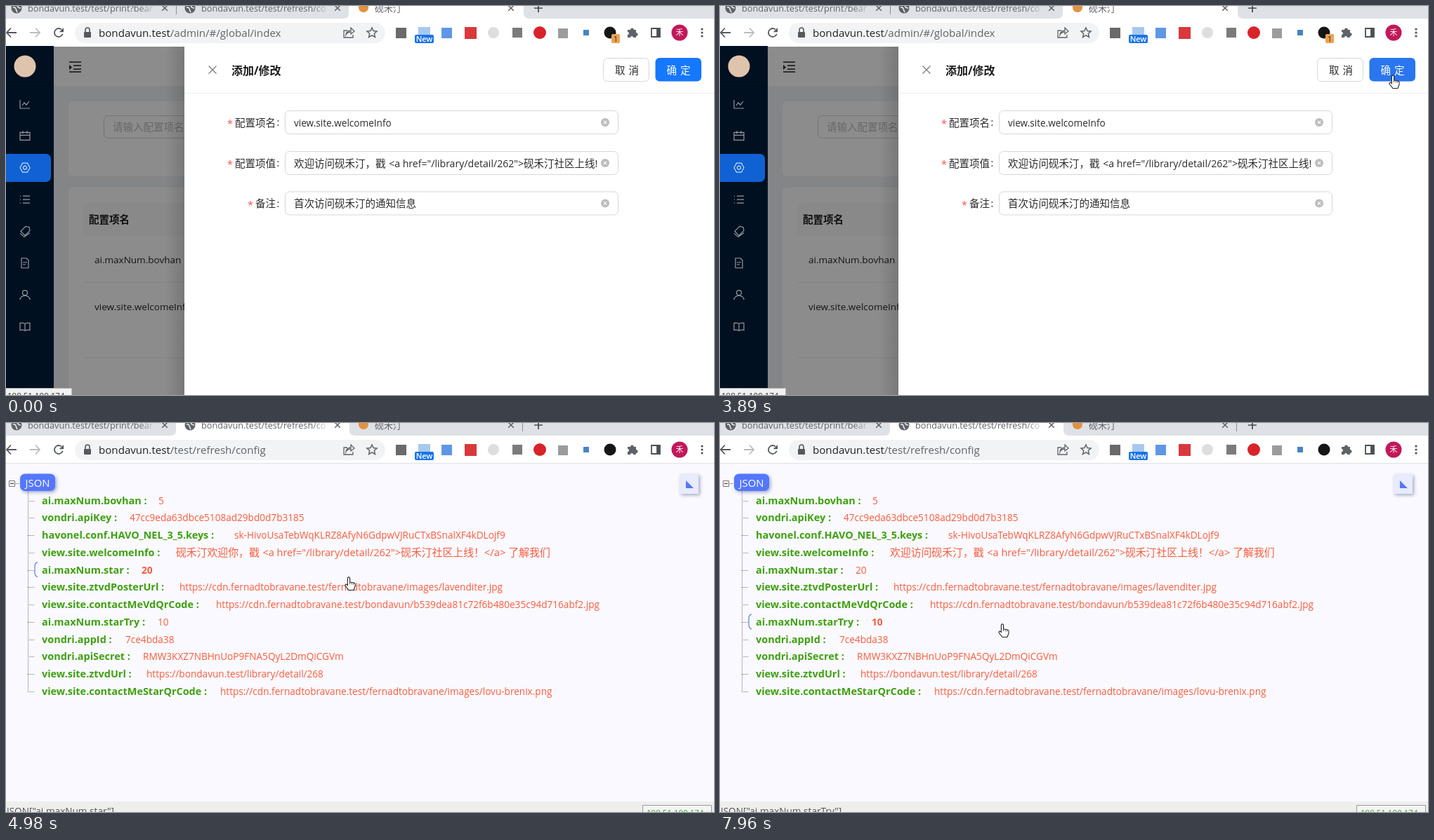
Recreate the animation shown at these times as an HTML page with a canvas. Size 1008x555 px, loop 8 s.

```html
<!DOCTYPE html>
<html lang="zh">
<head>
<meta charset="utf-8">
<title>Config refresh</title>
<style>
html, body { margin: 0; width: 100%; height: 100%; overflow: hidden; background: #fff; }
canvas { display: block; width: 1008px; height: 555px; }
</style>
</head>
<body>
<canvas id="stage" width="1008" height="555"></canvas>
<script>
const c = document.getElementById('stage').getContext('2d');
const FONT = '"Open Sans", "Noto Sans CJK SC", "Noto Sans CJK", sans-serif';
const LOOP = 8000, SWITCH = 4230, SUBMIT = 4090, RELOAD = 6880, BLANK = 7010, LOADED = 7150;
const SITE = 'bondavun.test', TEAM = '砚禾汀', INK = '#2b2b2b';
const CDN = 'https://cdn.fernadtobravane.test/';
const KEY = 'sk-HivoUsaTebWqKLRZ8AfyN6GdpwVJRuCTxBSnalXF4kDLojf9';

// Pointer path: time, x, y
const PATH = [
  [130, 945, 517], [270, 930, 447], [410, 930, 444], [700, 985, 330], [1160, 957, 106],
  [1300, 957, 98], [1630, 955, 100], [1900, 800, 190], [2180, 608, 257], [2380, 606, 255],
  [2470, 612, 225], [2700, 430, 8], [2900, 110, 6], [3050, 430, 8], [3270, 605, 216],
  [3550, 957, 100], [3820, 958, 99], [4090, 958, 99], [4160, 922, 111], [4229, 922, 111],
  [4230, 440, 4], [4370, 440, 6], [4780, 480, 190], [4980, 488, 220], [5040, 488, 220],
  [5300, 690, 290], [5600, 600, 150], [5720, 522, 62], [5850, 257, 41], [5920, 257, 41],
  [6300, 34, 40], [6540, 76, 40], [6740, 81, 39], [7620, 82, 39], [7760, 398, 300],
  [7960, 402, 287]
];

// Config entries: key, value, x of the value
const ROWS = [
  ['ai.maxNum.bovhan', '5', 217],
  ['vondri.apiKey', '47cc9eda63dbce5108ad29bd0d7b3185', 176],
  ['havonel.conf.HAVO_NEL_3_5.keys', KEY, 325],
  ['view.site.welcomeInfo', '', 242],
  ['ai.maxNum.star', '20', 193],
  ['view.site.ztvdPosterUrl', CDN + 'fernadtobravane/images/lavenditer.jpg', 247],
  ['view.site.contactMeVdQrCode', CDN + 'bondavun/b539dea81c72f6b480e35c94d716abf2.jpg', 299],
  ['ai.maxNum.starTry', '10', 216],
  ['vondri.appId', '7ce4bda38', 170],
  ['vondri.apiSecret', 'RMW3KXZ7NBHnUoP9FNA5QyL2DmQiCGVm', 195],
  ['view.site.ztvdUrl', 'https://' + SITE + '/library/detail/268', 200],
  ['view.site.contactMeStarQrCode', CDN + 'fernadtobravane/images/lovu-brenix.png', 305]
];

const MENU = [
  'M-7-6V6H7M-4 2L-1-2L2 1L6-4',
  'M-7-5H7V6H-7ZM-7-1H7M-3-7V-3M3-7V-3',
  'M-3.5-6.5H3.5L7 0L3.5 6.5H-3.5L-7 0ZM-2.5 0a2.5 2.5 0 1 0 5 0a2.5 2.5 0 1 0-5 0',
  'M-7-5h1M-7 0h1M-7 5h1M-3-5H7M-3 0H7M-3 5H7',
  'M-6 0L1-7L6-6L7-1L0 6ZM-7 3L-1 8L7 2',
  'M-5-7H2L5-4V7H-5ZM-3-1H3M-3 2H1',
  'M-3.5-3a3.5 3.5 0 1 0 7 0a3.5 3.5 0 1 0-7 0M-7 7a7 6 0 0 1 14 0',
  'M0-4V6M0-4C-2-6-7-5-7-5V5C-7 5-2 4 0 6C2 4 7 5 7 5V-5C7-5 2-6 0-4'
];

function text(s, x, y, size, color, weight = 400, align = 'left') {
  c.font = `${weight} ${size}px ${FONT}`;
  c.fillStyle = color;
  c.textAlign = align;
  c.fillText(s, x, y);
  return x + c.measureText(s).width;
}
function rect(x, y, w, h, color) {
  c.fillStyle = color;
  c.fillRect(x, y, w, h);
}
function box(x, y, w, h, r, fill, stroke) {
  c.beginPath();
  c.roundRect(x, y, w, h, r);
  if (fill) { c.fillStyle = fill; c.fill(); }
  if (stroke) { c.strokeStyle = stroke; c.lineWidth = 1; c.stroke(); }
}
function disc(x, y, r, color) {
  c.beginPath();
  c.arc(x, y, r, 0, 7);
  c.fillStyle = color;
  c.fill();
}
function icon(d, x, y, stroke, width = 1.2, fill) {
  const p = new Path2D(d);
  c.save();
  c.translate(x, y);
  if (fill) { c.fillStyle = fill; c.fill(p); }
  if (stroke) { c.strokeStyle = stroke; c.lineWidth = width; c.stroke(p); }
  c.restore();
}
function clipped(x, y, w, h, draw) {
  c.save();
  c.beginPath();
  c.rect(x, y, w, h);
  c.clip();
  draw();
  c.restore();
}
const cross = (x, y, r, color, w) => icon(`M${-r} ${-r}L${r} ${r}M${r} ${-r}L${-r} ${r}`, x, y, color, w);

function pointer(t) {
  if (t < PATH[0][0]) return null;
  const i = PATH.findIndex(p => p[0] > t);
  if (i < 0) return { x: 402, y: 287 };
  const [t0, x0, y0] = PATH[i - 1], [t1, x1, y1] = PATH[i];
  const k = (t - t0) / (t1 - t0);
  return { x: x0 + (x1 - x0) * k, y: y0 + (y1 - y0) * k };
}
const over = (p, x, y, w, h) => p && p.x >= x && p.x <= x + w && p.y >= y && p.y <= y + h;

function fadedTitle(s, x, end) {
  const g = c.createLinearGradient(end - 25, 0, end, 0);
  g.addColorStop(0, '#5f6368');
  g.addColorStop(1, 'rgba(95,99,104,0)');
  text(s, x, 8, 12.7, g);
}
function globe(x) {
  disc(x, 3, 7.5, '#5f6368');
  icon('M-5-1Q-2-2-1 1T1 6M1-4Q2 0 6 0', x, 3, '#e8eaed', 1.6);
}
function arrow(x, color, dir) {
  icon(`M${7 * dir} 0H${-6 * dir}M${-1 * dir}-6.5L${-7 * dir} 0L${-1 * dir} 6.5`, x, 38, color, 1.8);
}

function chrome(json, p, loading) {
  rect(0, 0, 1008, 18, '#dee1e6');
  rect(0, 18, 1008, 39, '#fff');
  const [a, b] = json ? [242, 489] : [488, 737];
  icon(`M${a - 8} 18Q${a} 18 ${a} 10V-5H${b}V10Q${b} 18 ${b + 8} 18Z`, 0, 0, null, 0, '#fff');
  rect(json ? 735 : 242, 0, 1, 12, '#8b8f94');
  globe(15);
  if (loading) {
    c.beginPath();
    c.arc(262, 3, 7, loading / 90, loading / 90 + 4.2);
    c.strokeStyle = '#1a73e8';
    c.lineWidth = 2;
    c.stroke();
  } else globe(262);
  disc(509, 2, 7, '#e2923f');
  fadedTitle(SITE + '/test/print?bear', 31, 214);
  fadedTitle(SITE + '/test/refresh/co', 278, 461);
  text(TEAM, 525, 8, 12.9, '#5f6368');
  for (const x of [226, 472, 719]) cross(x, 3, 3.8, '#5f6368', 1.5);
  icon('M-6 0H6M0-6V6', 758, 3, '#45494d', 1.7);

  arrow(8, '#55595e', 1);
  arrow(41, '#b9bdc2', -1);
  if (over(p, 61, 24, 28, 28)) disc(75, 38, 14, '#eceef0');
  if (loading) cross(75, 38, 5.5, '#55595e', 1.8);
  else {
    c.beginPath();
    c.arc(75, 38, 6, .3, 5.4);
    c.strokeStyle = '#55595e';
    c.lineWidth = 1.8;
    c.stroke();
    icon('M7-7V-.8H.8Z', 75, 38, null, 0, '#55595e');
  }

  box(98, 24, 442, 29, 14.5, '#f1f3f4');
  box(111, 37, 10, 8, 1, '#55595e');
  icon('M-3 0V-3a3 3 0 0 1 6 0V0', 116, 37, '#55595e', 1.6);
  const end = text(SITE, 132, 44, 15.1, '#202124');
  text(json ? '/test/refresh/config' : '/admin/#/global/index', end, 44, 15.1, '#5f6368');
  icon('M-2-3H-7V7H6V3M-4 3Q-3-3 3-3V-7L8-2L3 2V-1Q-2-1-4 3Z', 488, 38, '#5f6368', 1.3);
  icon('M0-7L2.1-2.4L7-1.9L3.3 1.4L4.4 6.4L0 3.8L-4.4 6.4L-3.3 1.4L-7-1.9L-2.1-2.4Z', 521, 38, '#5f6368', 1.5);

  rect(555, 31, 15, 15, '#6a6a6a');
  rect(587, 30, 17, 12, '#a8c9ee');
  box(582, 41, 27, 12, 2, '#1a73e8');
  text('New', 595.5, 51, 11, '#fff', 600, 'center');
  rect(620, 31, 15, 15, '#5f97e6');
  rect(653, 30, 17, 17, '#d9383c');
  disc(694, 38, 8, '#dedede');
  rect(721, 31, 14, 14, '#7b7b7b');
  disc(760, 38, 9, '#d8232a');
  rect(786, 32, 14, 14, '#9a9c9e');
  rect(822, 34, 8, 8, '#4784c4');
  disc(860, 38, 8.5, '#161616');
  if (!json) {
    box(862, 40, 12, 13, 2, '#eba352');
    text('1', 868, 51, 10.5, '#222', 400, 'center');
  }
  icon('M-7-4H-3a2.5 2.5 0 1 1 5 0H5V0a2.5 2.5 0 1 1 0 5V7H1a2 2 0 0 0-4 0H-7V3a2 2 0 0 0 0-4Z', 892, 38, null, 0, '#5f6368');
  icon('M-6-6H6V6H-6ZM2-6V6', 925, 38, '#4c5054', 1.8);
  rect(927, 32, 4, 12, '#4c5054');
  disc(959, 38, 11.5, '#c2185b');
  text('禾', 959, 42, 11, '#fff', 400, 'center');
  for (const y of [33, 38, 43]) disc(991, y, 1.6, '#4c5054');
  rect(0, 57, 1008, 1, '#dfe1e4');
}

function sidebar() {
  rect(0, 57, 68, 498, '#001020');
  rect(0, 114, 68, 1, '#000a15');
  disc(27, 86, 15.5, '#dfc4ad');
  box(0, 211, 64, 40, [0, 7, 7, 0], '#1061d4');
  MENU.forEach((d, i) => icon(d, 27, 140 + 45.35 * i, i === 2 ? '#c8dcf5' : '#9299a1', 1.2));
}

function table(fresh) {
  rect(68, 57, 940, 498, '#eff1f4');
  rect(68, 57, 940, 57, '#fff');
  icon('M-8-7H9M-2-2H9M-2 3H9M-8 7H9', 98, 87, '#222', 1.7);
  icon('M-8-3L-4 .5L-8 4Z', 98, 87, null, 0, '#222');
  box(89, 136, 940, 107, 6, '#fff');
  box(89, 259, 940, 320, 6, '#fff');
  box(139.5, 156.5, 156, 32, 6, '#fff', '#d0d0d0');
  text('请输入配置项名称', 152, 178, 14.5, '#b9b9b9');
  box(345.5, 156.5, 156, 32, 6, '#fff', '#d0d0d0');
  text('请输入配置项值', 358, 178, 14.5, '#b9b9b9');
  box(110, 281, 900, 47, [6, 6, 0, 0], '#f8f8f8');
  text('配置项名', 118, 310, 14.5, '#1c1c1c', 700);
  text('配置项值', 360, 310, 14.5, '#1c1c1c', 700);
  const list = fresh
    ? [[2, 362, 435, KEY], [8, 469, 541, ROWS[8][1]]]
    : [[0, 362, 394, '5'], [3, 429, 501, '']];
  for (const [row, y, line, value] of list) {
    text(ROWS[row][0], 126, y + 5, 13.5, '#222');
    text(value, 368, y + 5, 13.5, '#222');
    rect(110, line, 900, 1, '#ececec');
  }
}

function welcome(head, x, y, size, color, weight, tail) {
  x = text(head + '，戳', x, y, size, color, weight) + size * .32;
  x = text('<a href="/library/detail/262">', x, y, size * .973, color, weight);
  x = text(TEAM + '社区上线', x, y, size, color, weight);
  text(tail, x, y, size, color, weight);
}

function field(label, y, p, draw) {
  const lx = 384 - label.length * 14.5;
  text('*', lx - 11, y + 7, 14.5, '#ff4d4f');
  text(label, lx, y + 5.5, 14.5, INK);
  text(':', 385.5, y + 5, 14, INK);
  const hot = over(p, 397, y - 16, 475, 32);
  box(397.5, y - 16.5, 474, 33, 6, '#fff', hot ? '#4096ff' : '#d7d7d7');
  clipped(398, y - 16, 447, 32, draw);
  disc(853, y, 6, '#bdbdbd');
  cross(853, y, 2.2, '#fff', 1.1);
}

function drawer(slide, p) {
  const x = 254 + slide;
  const g = c.createLinearGradient(x - 28, 0, x, 0);
  g.addColorStop(0, 'rgba(0,0,0,0)');
  g.addColorStop(1, 'rgba(0,0,0,.14)');
  rect(x - 28, 58, 28, 497, g);
  c.save();
  c.translate(slide, 0);
  rect(254, 58, 760, 497, '#fff');
  cross(294, 91, 5.5, '#808080', 1.4);
  text('添加/修改', 321, 97.5, 16, '#1c1c1c', 700);
  box(850.5, 74.5, 65, 33, 6, '#fff', '#d7d7d7');
  text('取', 867, 96.5, 14.5, INK);
  text('消', 886.5, 96.5, 14.5, INK);
  const hot = !slide && over(p, 925, 74, 65, 33);
  box(924.5, 74, 65.5, 33.5, 6, hot ? '#2a76ee' : '#1677ff');
  text('确', 940.5, 96.5, 14.5, '#fff');
  text('定', 960, 96.5, 14.5, '#fff');
  rect(254, 124, 754, 1, '#eeeeee');
  field('配置项名', 166, p, () => text(ROWS[3][0], 410, 171.5, 13.6, INK));
  field('配置项值', 224, p, () => welcome('欢迎访问' + TEAM, 410, 229.5, 14.5, INK, 400, '!'));
  field('备注', 281.5, p, () => text(`首次访问${TEAM}的通知信息`, 410, 287, 14.5, INK));
  c.restore();
}

function loader() {
  rect(0, 58, 1008, 497, 'rgba(0,0,0,.48)');
  rect(0, 57, 110, 3, '#1b70a6');
  for (const [x, y] of [[503, 301], [514, 317], [497, 326], [487, 310]]) disc(x, y, 5, '#5a86b4');
  c.beginPath();
  c.arc(990, 84, 8.5, -.5, 2.1);
  c.strokeStyle = '#2c6d95';
  c.lineWidth = 2;
  c.stroke();
}

function admin(t, p) {
  const busy = t >= SUBMIT, slide = t >= 4160 ? 168 : 0;
  table(slide > 0);
  rect(68, 58, 940, 497, `rgba(0,0,0,${.45 * (1 - slide / 754)})`);
  sidebar();
  drawer(slide, busy ? null : p);
  if (busy) loader();
  box(-.5, 545.5, 94, 20, 0, '#f1f1f1', '#b8b8b8');
  text('198.51.100.174', 2, 560, 11.5, '#333');
}

const rowAt = p => over(p, 42, 98.2, 800, 297) ? Math.floor((p.y - 98.1) / 24.77) : -1;

function jsonPage(t, p) {
  rect(0, 58, 1008, 497, '#f9f9ff');
  const hit = rowAt(p), green = '#3fa00f', red = '#f95b3d';
  c.save();
  c.strokeStyle = '#777';
  c.lineWidth = 1;
  c.setLineDash([1, 1]);
  c.beginPath();
  c.moveTo(31.5, 97);
  c.lineTo(31.5, 384);
  ROWS.forEach((r, i) => {
    const y = Math.round(110.5 + 24.77 * i) + .5;
    c.moveTo(31, y);
    c.lineTo(41, y);
  });
  c.stroke();
  c.restore();
  box(4.5, 82.5, 8, 8, 0, '#fff', '#777');
  rect(6, 86, 5, 1, '#333');
  rect(13, 86, 6, 1, '#aaa');

  c.save();
  c.shadowColor = 'rgba(60,70,120,.45)';
  c.shadowBlur = 5;
  c.shadowOffsetX = c.shadowOffsetY = 2;
  box(20, 72.5, 50, 24.5, 7, '#5577ff');
  box(959, 73, 27, 28, 1, '#e8ebfb');
  c.restore();
  text('JSON', 45, 90.5, 14.8, '#fff', 400, 'center');
  icon('M968 82V93H979Z', 0, 0, null, 0, '#5577ff');

  ROWS.forEach(([key, value, x], i) => {
    const y = 115.5 + 24.77 * i, weight = i === hit ? 700 : 400;
    text(key + ' :', 51, y, 14.45, green, 700);
    if (value) text(value, x, y, 13.6, red, weight);
    else welcome(t < LOADED ? TEAM + '欢迎你' : '欢迎访问' + TEAM, x, y, 14.85, red, weight, '！</a> 了解我们');
    if (i === hit) icon('M4-11Q0-10 0-5V4Q0 9 4 10', 41, y - 5, '#5f7fd0', 1.2);
  });

  rect(0, 540, 1008, 15, '#eeeeee');
  if (hit >= 0) text(`JSON["${ROWS[hit][0]}"]`, 1, 559, 13.6, '#555');
  box(906.5, 545.5, 98, 20, 0, '#f4f4f4', '#999');
  text('198.51.100.174', 912, 560, 11.5, '#3f9a3f');
}

function cursor(p, json) {
  if (!p) return;
  const hand = json ? rowAt(p) >= 0 : over(p, 925, 74, 65, 33);
  const beam = over(p, 130, 24, 345, 29) ||
    !json && [150, 207, 265].some(y => over(p, 398, y, 445, 32));
  if (hand) {
    icon('M-1.6 1.5a1.6 1.6 0 0 1 3.2 0V7Q7 7.3 8.8 9Q9.6 10 9 13L7 18.5H0L-5 12Q-5.2 9.6-3 10.2L-1.6 11.5Z', p.x, p.y, '#222', 1.1, '#fff');
    icon('M1.6 7V10M4.2 7.8V10.3M6.6 8.4V10.6', p.x, p.y, '#222', .8);
  } else if (beam) {
    icon('M-3-7H-1L0-6L1-7H3M0-6V6M-3 7H-1L0 6L1 7H3', p.x, p.y, '#333', 1.1);
  } else {
    icon('M0 0V13.5L3.2 10.7L5.6 15.8L7.7 14.8L5.4 9.9H9.6Z', p.x, p.y, '#222', 1, '#fff');
  }
}

function render(t) {
  const json = t >= SWITCH, p = pointer(t);
  const loading = t >= RELOAD && t < LOADED ? t - RELOAD + 1 : 0;
  c.clearRect(0, 0, 1008, 555);
  chrome(json, p, loading);
  if (!json) admin(t, p);
  else if (t >= BLANK && t < LOADED) rect(0, 58, 1008, 497, '#fff');
  else jsonPage(t, p);
  cursor(p, json);
}

const start = performance.now();
function tick() {
  render((performance.now() - start) % LOOP);
  requestAnimationFrame(tick);
}
tick();
</script>
</body>
</html>
```
